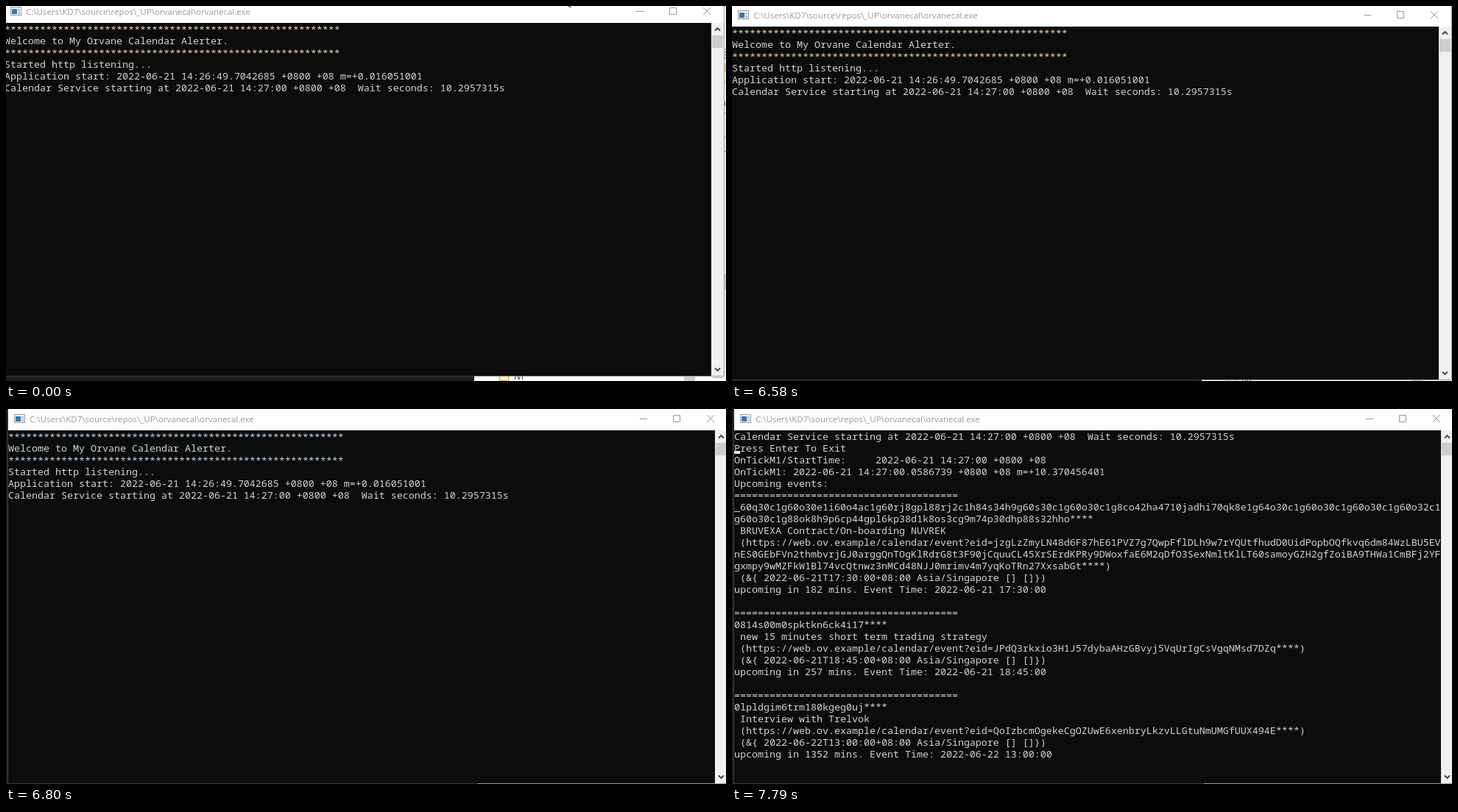
These frames come from a looping animation (978 by 510 pixels, 8 s). An HTML page:

```html
<!DOCTYPE html>
<html lang="en">
<head>
<meta charset="utf-8">
<title>Console</title>
<style>
  html, body { margin: 0; width: 100%; height: 100%; overflow: hidden; background: #1e1e1e; }
  #scene { position: absolute; left: 0; top: 0; width: 0; height: 0; }
  svg { position: absolute; left: 0; top: 0; width: 1px; height: 1px; overflow: visible; }
  svg text { font: 11.5px "Open Sans", "Noto Sans", sans-serif; }
  pre {
    position: absolute; left: 0; top: 0; margin: 0; color: #d4d4d4;
    font: 13.3333px/16px "Noto Sans Mono", "DejaVu Sans Mono", monospace;
    font-variant-ligatures: none;
  }
  .stars { position: relative; top: 1px; color: var(--star); }
</style>
</head>
<body>
<div id="scene">
  <svg>
    <!-- windows behind the console -->
    <path d="M638 480h342v40h-342zM977-40h20v560h-20z" fill="#fff"/>
    <rect x="672.5" y="474.5" width="12" height="12" fill="#fff0c0" stroke="#c9a24a"/>
    <text x="692" y="485" fill="#222">IVI</text>
    <path d="M923 480h15v30h-15zM977 341h3v22h-3z" fill="#cdcdcd"/>
    <path d="M962 482.500h13M977 35.500h3M977 122.500h3M977 155.500h3" stroke="#999"/>
    <path d="M978 39.500h2M978 43.500h2M978 47.500h2M978 78v5M978.500 107v6M978 174.500h2" stroke="#666"/>
    <rect x="978" y="55" width="2" height="11" fill="#f0cf70"/>

    <!-- console window -->
    <path d="M-.5-30V480.500H638" fill="none" stroke="#3c3c3c"/>
    <path d="M638 480.500H977.500V-30" fill="none" stroke="#999"/>
    <rect y="-30" width="977" height="30" fill="#fff"/>
    <rect width="960" height="480" fill="#0c0c0c"/>
    <rect x="8.500" y="-21.500" width="14" height="11" fill="#f4f4f4" stroke="#9a9a9a"/>
    <path d="M10-19h7v7h-7z" fill="#3a78a8"/>
    <path d="M18-19h3v3h-3zM18-15h3v3h-3z" fill="#b8c4cc"/>
    <text x="29" y="-11" fill="#999">C:\Users\KD7\source\repos\_UP\orvanecal\orvanecal.exe</text>
    <path d="M858-15.500h10M903.500-20.500h9v9h-9zM949-21l10 10M959-21l-10 10" fill="none" stroke="#999"/>

    <!-- scrollbar -->
    <rect x="960" width="17" height="480" fill="#f0f0f0"/>
    <rect x="961" y="17" width="15" height="17" fill="#cdcdcd"/>
    <path d="M965 10.500l3.500-3.500 3.500 3.500M965 469.500l3.500 3.500 3.500-3.500" fill="none" stroke="#404040" stroke-width="1.800"/>

    <path id="pointer" d="M0-23h2l3 2h-2z" fill="#222"/>
  </svg>
  <pre id="log"></pre>
  <svg><rect id="caret" y="28" width="8" height="4" fill="#e6e6e6"/></svg>
</div>

<script>
const $ = id => document.getElementById(id);
const COLS = 120, LOOP = 8000;

let seed = 7;
const rand = n => (seed = seed * 16807 % 2147483647) % n;
const CHARS = 'ABCDEFGHIJKLMNOPQRSTUVWXYZabcdefghijklmnopqrstuvwxyz0123456789';
const token = n => Array.from({ length: n }, () => CHARS[rand(CHARS.length)]).join('');
const wrap = s => s.match(new RegExp(`.{1,${COLS}}`, 'g'));

function eventLines(id, title, eidLength, day, time, mins) {
  return [
    '='.repeat(38),
    ...wrap(id + '****'),
    ' ' + title,
    ...wrap(` (https://web.ov.example/calendar/event?eid=${token(eidLength)}****)`),
    ` (&{ ${day}T${time}+08:00 Asia/Singapore [] []})`,
    `upcoming in ${mins} mins. Event Time: ${day} ${time}`,
    ''
  ];
}

const stars = `<span class="stars">${'*'.repeat(57)}</span>`;
const lines = [
  stars,
  'Welcome to My Orvane Calendar Alerter.',
  stars,
  'Started http listening...',
  'Application start: 2022-06-21 14:26:49.7042685 +0800 +08 m=+0.016051001',
  'Calendar Service starting at 2022-06-21 14:27:00 +0800 +08  Wait seconds: 10.2957315s',
  'Press Enter To Exit',
  'OnTickM1/StartTime:     2022-06-21 14:27:00 +0800 +08',
  'OnTickM1: 2022-06-21 14:27:00.0586739 +0800 +08 m=+10.370456401',
  'Upcoming events:',
  ...eventLines(
    '_60q30c1g60o30e1i60o4ac1g60rj8gpl88rj2c1h84s34h9g60s30c1g60o' +
    '30c1g8co42ha4710jadhi70qk8e1g64o30c1g60o30c1g60o30c1g60o32c1' +
    'g60o30c1g88ok8h9p6cp44gpl6kp38d1k8os3cg9m74p30dhp88s32hho',
    'BRUVEXA Contract/On-boarding NUVREK', 255, '2022-06-21', '17:30:00', 182),
  ...eventLines('0814s00m0spktkn6ck4i17',
    'new 15 minutes short term trading strategy', 48, '2022-06-21', '18:45:00', 257),
  ...eventLines('0lpldgim6trm180kgeg0uj',
    'Interview with Trelvok', 48, '2022-06-22', '13:00:00', 1352)
];

// Last step whose start time has passed: [start, ...values]
const at = (steps, t) => steps.findLast(s => s[0] <= t).slice(1);
const pan = [[0, -2, 23], [6580, 0, 28], [6680, 2, 29], [6800, 3, 29]];
const output = [[0, 0, 6], [7130, 0, 9], [7690, 0, 10], [7790, 5, lines.length]];
const pointer = [[0, 765], [440, 782], [550, -99]];

let shown = 0;
function draw() {
  const t = performance.now() % LOOP;
  const [x, y] = at(pan, t);
  const [first, end] = at(output, t);
  const [px] = at(pointer, t);
  $('scene').style.transform = `translate(${x}px, ${y}px)`;
  $('scene').style.setProperty('--star', t < 6680 ? '#e8d6c0' : '#c8d8e6');
  $('pointer').setAttribute('transform', `translate(${px},0)`);
  $('pointer').style.display = px < 0 ? 'none' : '';
  $('caret').style.display = first ? '' : 'none';
  if (shown !== end) {
    $('log').innerHTML = lines.slice(first, end).join('\n').replace(/&(?={)/g, '&amp;');
    shown = end;
  }
  requestAnimationFrame(draw);
}
draw();
</script>
</body>
</html>
```
